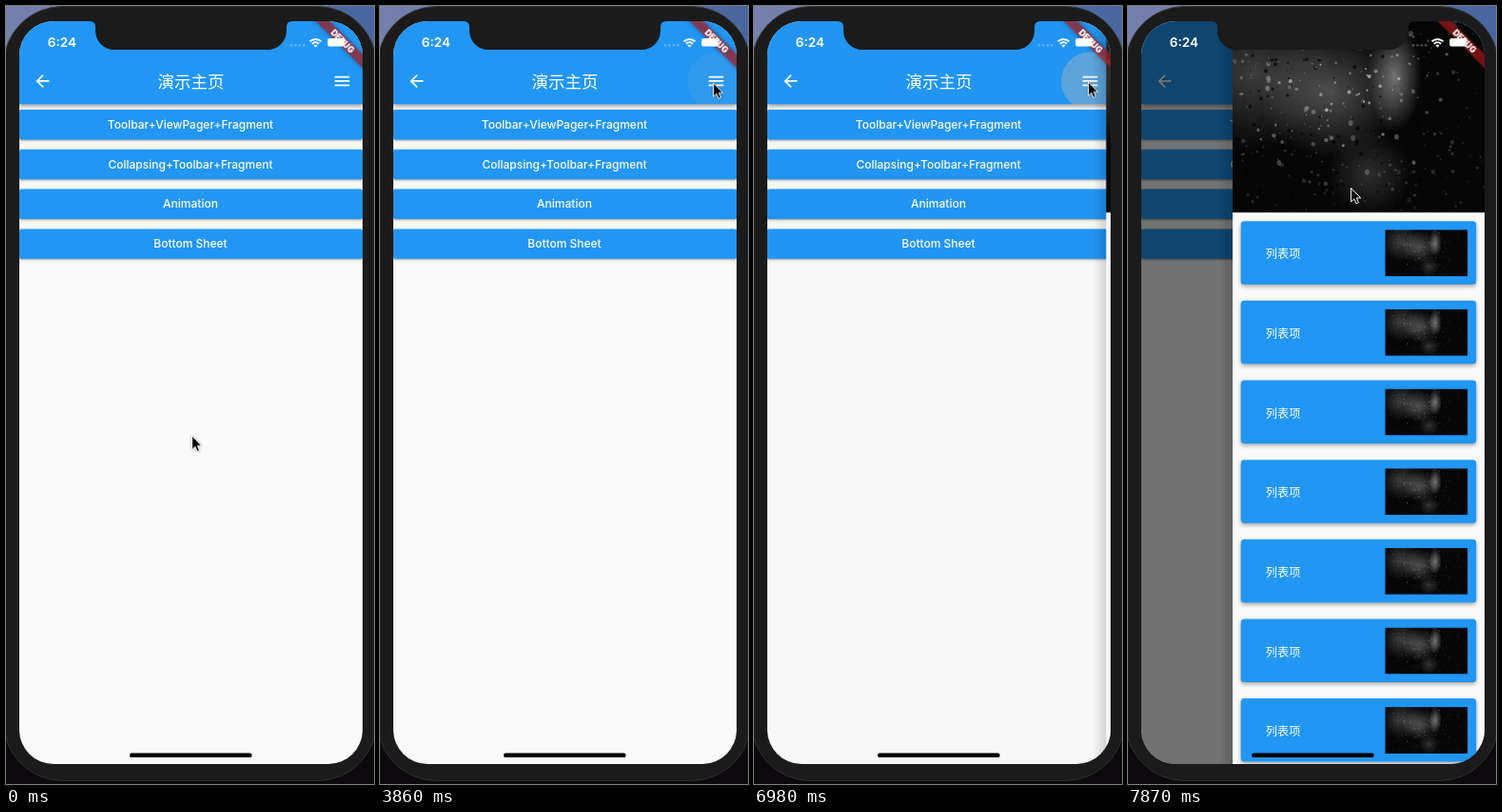
Write an HTML page that moves like this. It is 387 px wide and 818 px high and loops after 8000 ms.

```html
<!DOCTYPE html>
<html lang="zh-CN">
<head>
<meta charset="utf-8">
<title>Drawer demo</title>
<style>
html, body { margin: 0; width: 100%; height: 100%; overflow: hidden; background: #0c0a0c; }
svg { display: block; width: 387px; height: 818px; }
text { fill: #fff; font-family: Inter, "Open Sans", sans-serif; }
.mid { text-anchor: middle; }
.label { font-size: 12px; font-weight: 500; }
.cjk { font-family: "Noto Sans CJK SC", "Noto Sans CJK", sans-serif; }
.title { font-size: 17.5px; font-weight: 500; }
.item { font-size: 12.2px; font-weight: 400; }
.raised { fill: #2196f3; filter: drop-shadow(0 1.6px 1.2px rgba(0, 0, 0, .38)); }
.card { fill: #2196f3; filter: drop-shadow(0 2px 2px rgba(0, 0, 0, .35)); }
</style>
</head>
<body>
<svg viewBox="0 0 387 818">
  <defs>
    <linearGradient id="desk">
      <stop offset="0" stop-color="#7680ac"/>
      <stop offset="1" stop-color="#48659f"/>
    </linearGradient>
    <radialGradient id="soft">
      <stop offset="0" stop-color="#fff"/>
      <stop offset=".5" stop-color="#fff" stop-opacity=".5"/>
      <stop offset="1" stop-color="#fff" stop-opacity="0"/>
    </radialGradient>
    <linearGradient id="edge">
      <stop offset="0" stop-opacity="0"/>
      <stop offset="1" stop-opacity=".15"/>
    </linearGradient>
    <clipPath id="screen"><rect x="14" y="16" width="361" height="781" rx="36"/></clipPath>
    <clipPath id="bar"><rect x="14" y="16" width="361" height="87.2"/></clipPath>
    <clipPath id="hero"><rect width="265" height="201.5"/></clipPath>
    <clipPath id="frame"><rect width="358" height="201.5"/></clipPath>
    <g id="photo" clip-path="url(#frame)"><rect width="358" height="201.5" fill="#060606"/></g>
  </defs>

  <rect width="387" height="818" fill="#0c0a0c"/>
  <rect width="387" height="90" fill="url(#desk)"/>
  <rect x="-2.5" y=".5" width="392" height="814" rx="62" fill="#1b1b1b" stroke="#303030"/>

  <g clip-path="url(#screen)">
    <rect x="14" y="16" width="361" height="781" fill="#fafafa"/>
    <g id="buttons"></g>
    <rect class="raised" x="14" y="16" width="361" height="87.2" style="filter:drop-shadow(0 2px 2px rgba(0,0,0,.4))"/>
    <g clip-path="url(#bar)">
      <circle id="glow" cx="353.5" cy="79" r="30.5" fill="#bcbcbc" fill-opacity=".4"/>
    </g>
    <path fill="#fff" transform="translate(28 68.5) scale(.872)" d="M20 11H7.83l5.59-5.59L12 4l-8 8 8 8 1.41-1.41L7.83 13H20z"/>
    <path fill="#fff" transform="translate(343 68.5) scale(.872)" d="M3 18h18v-2H3zm0-5h18v-2H3zm0-7v2h18V6z"/>
    <text class="mid cjk title" x="194.5" y="85.8">演示主页</text>

    <rect id="scrim" x="14" y="16" width="361" height="781"/>
    <g id="drawer">
      <rect x="-14" y="16" width="14" height="781" fill="url(#edge)"/>
      <rect y="16" width="265" height="781" fill="#fafafa"/>
      <g transform="translate(0 16)" clip-path="url(#hero)"><use href="#photo" x="-46.5"/></g>
      <g id="cards"></g>
    </g>

    <g id="tip">
      <rect x="209" y="100" width="157" height="28" rx="3.5" fill="#616161" fill-opacity=".9"/>
      <text class="mid" x="287.4" y="118.2" font-size="12">Open navigation menu</text>
    </g>

    <g transform="translate(375 16) rotate(45)">
      <rect x="-50" y="24.4" width="100" height="10.5" fill="#b71c1c" fill-opacity=".627" style="filter:drop-shadow(0 0 2.5px rgba(0,0,0,.5))"/>
      <text class="mid" y="32.8" font-size="8.8" font-weight="900">DEBUG</text>
    </g>
  </g>

  <path fill="#1b1b1b" d="M88 15v1q6 0 6 6v4a20 20 0 0 0 20 20h161a20 20 0 0 0 20-20v-4q0-6 6-6v-1z"/>
  <text x="43.8" y="43.2" font-size="13.6" font-weight="600">6:24</text>
  <g fill="#fff">
    <g id="dots" opacity=".27"></g>
    <path fill="none" stroke="#fff" stroke-width="2" d="M319.6 37.3a8.4 8.4 0 0 1 11.8 0M321.9 39.8a5.1 5.1 0 0 1 7.2 0"/>
    <path d="M325.5 43.4l-2-2a2.8 2.8 0 0 1 4 0z"/>
    <rect x="338.2" y="34" width="17.4" height="8.4" rx="2"/>
    <path opacity=".5" d="M356.4 36.5q1.6 1.6 0 3.2z"/>
  </g>
  <rect x="130" y="785.6" width="128.6" height="4.5" rx="2.2"/>

  <g id="cursor">
    <path stroke="#fff" stroke-linejoin="round" style="filter:drop-shadow(0 .8px .8px rgba(0,0,0,.4))"
      d="M.6.4V14.9L3.9 11.8l2.1 5 2.5-1.1L6.4 10.9h4.4z"/>
  </g>
</svg>
<script>
const LOOP = 8000, TICK = 147;
const $ = id => document.getElementById(id);

function add(parent, tag, attrs, text) {
  const el = document.createElementNS('http://www.w3.org/2000/svg', tag);
  for (const k in attrs) el.setAttribute(k, attrs[k]);
  if (text) el.textContent = text;
  return parent.appendChild(el);
}

['Toolbar+ViewPager+Fragment', 'Collapsing+Toolbar+Fragment', 'Animation', 'Bottom Sheet'].forEach((name, i) => {
  const y = 109 + 41.8 * i;
  add($('buttons'), 'rect', { class: 'raised', x: 14, y, width: 361, height: 31.4, rx: 1.8 });
  add($('buttons'), 'text', { class: 'mid label', x: 194, y: y + 19.8 }, name);
});

for (let i = 0; i < 4; i++) add($('dots'), 'circle', { cx: 300 + 4.4 * i, cy: 41.3, r: 1.4 });

// Wet window at night: a few soft lights under seeded drops.
function paintPhoto(g) {
  let seed = 11;
  const rnd = () => (seed = seed * 16807 % 2147483647) / 2147483647;
  const light = (cx, cy, rx, ry, opacity) =>
    add(g, 'ellipse', { cx, cy, rx, ry, opacity, fill: 'url(#soft)' });
  light(70, 55, 85, 80, .22);
  light(150, 75, 75, 70, .28);
  light(217, 58, 28, 58, .42);
  light(190, 160, 45, 45, .16);

  for (let i = 0; i < 650; i++) {
    const cx = rnd() * 358, cy = rnd() * 201, r = .6 + 1.8 * rnd() ** 2;
    const lit = .18 + .6 * Math.exp(-(((cx - 160) / 110) ** 2) - ((cy - 70) / 75) ** 2);
    const dark = rnd() < .4;
    add(g, 'ellipse', {
      cx, cy, rx: r, ry: r * (.8 + .5 * rnd()),
      fill: dark ? '#000' : '#ccc', opacity: dark ? .65 : lit * (.4 + .6 * rnd())
    });
  }
}
paintPhoto($('photo'));

for (let i = 0; i < 7; i++) {
  const y = 226.2 + 83.65 * i, g = $('cards');
  add(g, 'rect', { class: 'card', x: 8.7, y, width: 247.5, height: 66.5, rx: 3.5 });
  add(g, 'text', { class: 'cjk item', x: 34.8, y: y + 39.2 }, '列表项');
  add(g, 'use', { href: '#photo', transform: `translate(160.3 ${y + 9}) scale(.243)` });
}

// Motion advances in coarse ticks, the first one at the start time.
const ticks = (t, start) => Math.max(0, Math.floor((t - start) / TICK) + 1);
const ramp = (t, start, steps) => Math.min(1, ticks(t, start) / steps);
const smooth = k => k * k * (3 - 2 * k);

// Pointer legs: start, steps, x, y
const legs = [
  [136, 3, 281, 266], [730, 4, 273, 240], [1620, 4, 350, 80.5],
  [5200, 2, 351, 79.5], [7720, 2, 234, 191]
];

function pointer(t) {
  let x = 195, y = 451.5;
  for (const [start, steps, toX, toY] of legs) {
    const k = smooth(ramp(t, start, steps));
    x += (toX - x) * k;
    y += (toY - y) * k;
  }
  return { x, y };
}

// A press swells over two ticks, then lets go.
const press = (t, start, release, steps) =>
  ramp(t, start, 2) ** 2 * (1 - ramp(t, release, steps));

// Critically damped spring that snaps shut near its end.
function opened(t) {
  const x = Math.max(0, 3.3 * ticks(t, 6975) - 3.1);
  const p = 1 - Math.exp(-x) * (1 + x);
  return p > .99 ? 1 : p;
}

// Samples a rule over the loop and keeps a held keyframe for each change.
function play(id, rule) {
  const frames = [];
  let last;
  for (let t = 0; t < LOOP; t += 10) {
    const style = rule(t), key = JSON.stringify(style);
    if (key !== last) frames.push({ offset: t / LOOP, easing: 'step-end', ...style });
    last = key;
  }
  frames.push({ ...frames[frames.length - 1], offset: 1 });
  $(id).animate(frames, { duration: LOOP, iterations: Infinity });
}
const fade = opacity => ({ opacity });
const move = (x, y) => ({ transform: `translate(${x}px, ${y}px)` });

play('cursor', t => {
  const { x, y } = pointer(t);
  return move(x, y);
});
play('glow', t => fade(press(t, 3860, 4305, 2) + press(t, 6680, 7120, 1)));
play('tip', t => fade(ramp(t, 4305, 2) - ramp(t, 6240, 2)));
play('scrim', t => fade(.54 * opened(t)));
play('drawer', t => {
  const p = opened(t);
  return { ...move(110 + 265 * (1 - p), 0), opacity: p > 0 ? 1 : 0 };
});
</script>
</body>
</html>
```
